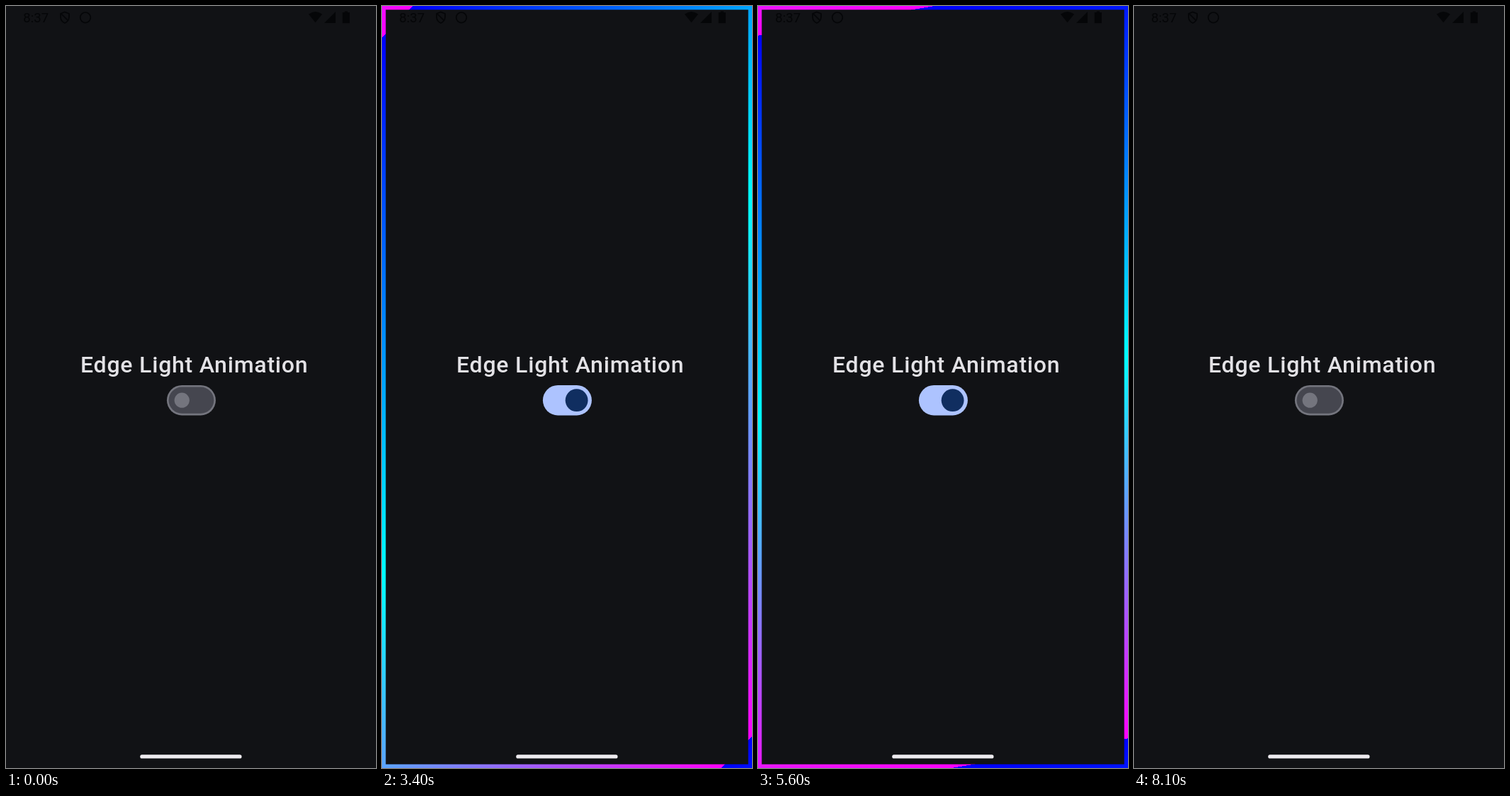
An HTML page with a canvas that plays this animation: 522 px wide and 1073 px high, repeating every 9.1 s.

```html
<!DOCTYPE html>
<html lang="en">
<head>
<meta charset="utf-8">
<title>Edge light</title>
<style>
  html, body { margin: 0; width: 100%; height: 100%; overflow: hidden; background: #111215; }
  canvas { display: block; }
</style>
</head>
<body>
<canvas id="stage" width="522" height="1073"></canvas>
<script>
const ctx = document.getElementById('stage').getContext('2d');
const W = 522, H = 1073, LOOP = 9100, STEP = 100;
const DP = 1.327, BORDER = 4 * DP, R = H / 2 - BORDER;
const BG = '#111215', DARK = '#050608', INK = '#e3e2e6';

// Each tap: press time, release time, state after the release
const TAPS = [
  { press: 460, release: 600, on: true },
  { press: 7260, release: 7400, on: false }
];
const OFF = { x: 248.2, r: 8 * DP };
const ON = { x: 274.6, r: 12 * DP };
const PRESSED = 14 * DP;
const SWITCH_Y = 555.2;

const clamp = v => Math.max(0, Math.min(1, v));
const mix = (a, b, k) => a + (b - a) * k;

function disc(x, y, r, color) {
  ctx.fillStyle = color;
  ctx.beginPath();
  ctx.arc(x, y, r, 0, Math.PI * 2);
  ctx.fill();
}

function pill(x, y, w, h, color) {
  ctx.fillStyle = color;
  ctx.beginPath();
  ctx.roundRect(x, y, w, h, h / 2);
  ctx.fill();
}

function poly(points, color) {
  ctx.fillStyle = color;
  ctx.beginPath();
  points.forEach(([x, y]) => ctx.lineTo(x, y));
  ctx.closePath();
  ctx.fill();
}

function label(text, x, y, font, spacing, color) {
  ctx.font = font;
  ctx.letterSpacing = spacing;
  ctx.fillStyle = color;
  ctx.fillText(text, x, y);
}

function statusBar() {
  label('8:37', 24.3, 23, '400 18.6px Roboto, sans-serif', '0px', DARK);

  ctx.strokeStyle = DARK;
  ctx.lineWidth = 1.7;
  ctx.beginPath();
  ctx.moveTo(83, 8.5);
  ctx.lineTo(89, 10.8);
  ctx.lineTo(89, 15.5);
  ctx.quadraticCurveTo(88.6, 21.5, 83, 24);
  ctx.quadraticCurveTo(77.2, 21.5, 77, 15.5);
  ctx.lineTo(77, 10.8);
  ctx.closePath();
  ctx.moveTo(78, 11);
  ctx.lineTo(88, 21);
  ctx.stroke();

  ctx.beginPath();
  ctx.arc(112, 16.3, 7.3, 0, Math.PI * 2);
  ctx.stroke();

  ctx.fillStyle = DARK;
  ctx.beginPath();
  ctx.moveTo(436.5, 23.3);
  ctx.lineTo(427, 11.6);
  ctx.quadraticCurveTo(436.5, 4.6, 446, 11.6);
  ctx.fill();
  poly([[449, 24], [465, 24], [465, 8]], DARK);
  ctx.fillRect(474.8, 9, 10, 15.2);
  ctx.fillRect(477.8, 7.4, 4, 2);
}

// Blue-cyan-magenta stripes, repeated along an axis turning about the centre
function edgeLight(t) {
  const a = (0.18 * t - 207.5) * Math.PI / 180;
  const dx = Math.cos(a) * R * 3, dy = Math.sin(a) * R * 3;
  const cx = W / 2, cy = H / 2;
  const g = ctx.createLinearGradient(cx - dx, cy - dy, cx + dx, cy + dy);
  for (let i = 0; i < 3; i++) {
    ['#00f', '#0ff', '#f0f'].forEach((c, j) => g.addColorStop((i + j / 2) / 3, c));
  }
  ctx.fillStyle = g;
  ctx.beginPath();
  ctx.rect(0, 0, W, H);
  ctx.rect(BORDER, BORDER, W - 2 * BORDER, H - 2 * BORDER);
  ctx.fill('evenodd');
}

function ripple(x, age) {
  if (age < 0 || age > 825) return;
  const grow = 1 - (1 - clamp(age / 450)) ** 3;
  const alpha = 0.1 * clamp(age / 75) * (1 - clamp((age - 450) / 375));
  disc(x, SWITCH_Y, 20 * DP * mix(0.4, 1, grow), `rgba(227,226,230,${alpha})`);
}

function toggle(t, on) {
  let { x, r } = OFF;
  for (const tap of TAPS) {
    if (t < tap.press) break;
    const end = tap.on ? ON : OFF;
    const moved = clamp((t - tap.release) / 100);
    r = mix(mix(r, PRESSED, clamp((t - tap.press) / 100)), end.r, moved);
    x = mix(x, end.x, moved);
  }
  const left = 226.9, top = SWITCH_Y - 16 * DP, w = 52 * DP, h = 32 * DP;
  if (on) {
    pill(left, top, w, h, '#adc3ff');
  } else {
    const b = 2 * DP;
    pill(left, top, w, h, '#74757e');
    pill(left + b, top + b, w - 2 * b, h - 2 * b, '#45464f');
  }
  disc(x, SWITCH_Y, r, on ? '#102e60' : '#74757e');
  TAPS.forEach(tap => ripple(x, t - tap.press));
}

function draw(t) {
  const on = t >= TAPS[0].release && t < TAPS[1].release;
  ctx.fillStyle = BG;
  ctx.fillRect(0, 0, W, H);
  statusBar();
  if (on) edgeLight(t);
  label('Edge Light Animation', 105, 515.5, '500 32px Roboto, sans-serif', '0.78px', INK);
  toggle(t, on);
  pill(189.2, 1054.3, 108 * DP, BORDER, '#eeebef');
}

const start = performance.now();
function tick() {
  const t = (performance.now() - start) % LOOP;
  draw(Math.floor(t / STEP) * STEP);
  requestAnimationFrame(tick);
}
tick();
</script>
</body>
</html>
```
